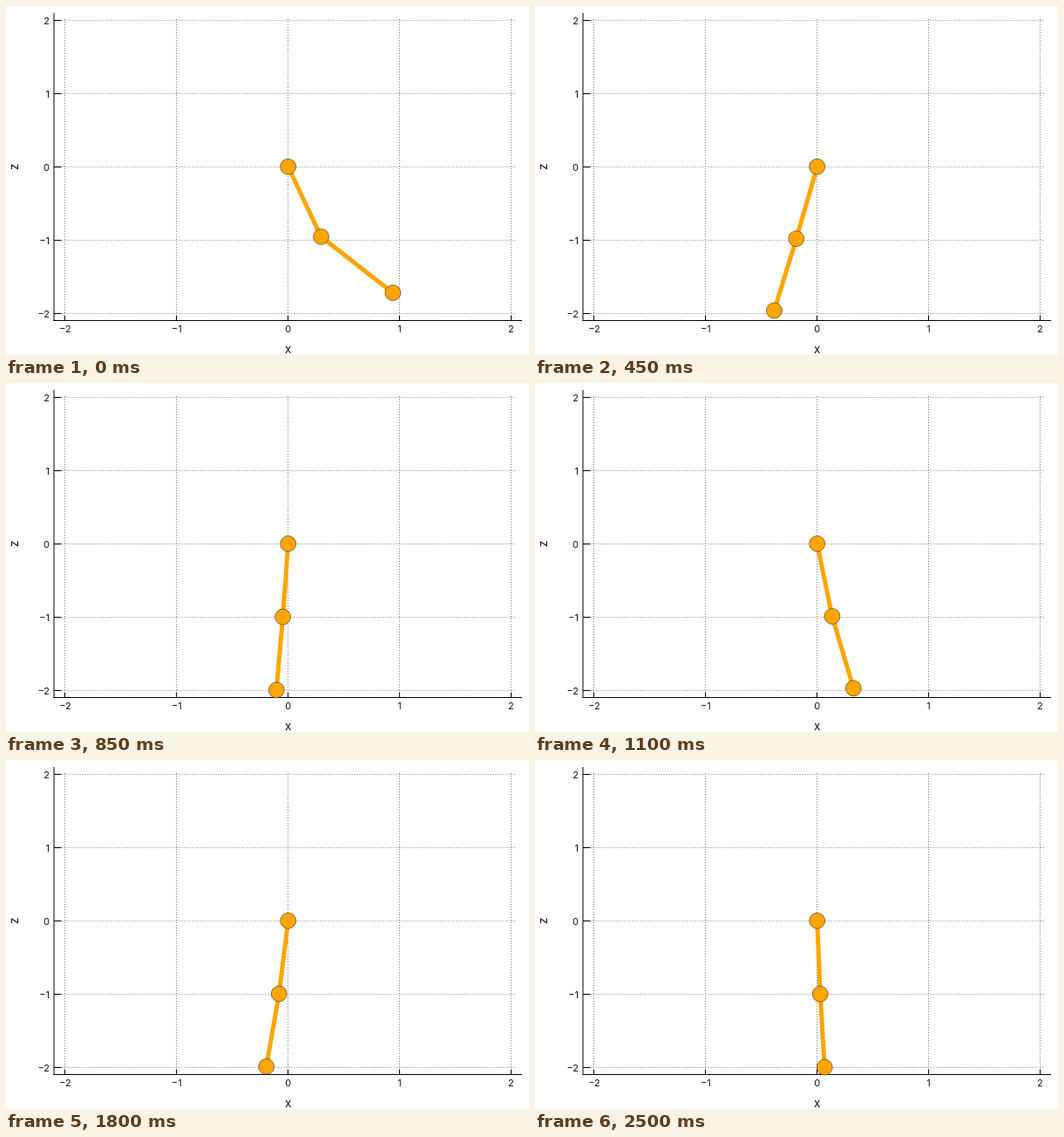
An HTML page that plays this animation: 600x400 px, repeating every 2.55 s.

```html
<!DOCTYPE html>
<html lang="en">
<head>
<meta charset="utf-8">
<title>Damped double pendulum</title>
<style>
  html, body { margin: 0; width: 100%; height: 100%; overflow: hidden; background: #fff; }
  svg { display: block; width: 600px; height: 400px; }
  text { font-family: Inter, "Liberation Sans", sans-serif; font-size: 11px; fill: #111; }
  .name { font-size: 13.5px; }
  .axis { stroke: #000; stroke-width: 1; fill: none; }
  .grid { stroke: #000; stroke-opacity: .5; stroke-width: 1; stroke-dasharray: 1 2; fill: none; }
  #arm { stroke: #ffa500; stroke-width: 5; stroke-linejoin: round; fill: none; }
  circle { fill: #ffa500; stroke: #000; stroke-opacity: .65; stroke-width: .7; }
</style>
</head>
<body>
<svg viewBox="0 0 600 400">
  <g id="plot"></g>
  <polyline id="arm"/>
  <g id="joints"><circle r="9"/><circle r="9"/><circle r="9"/></g>
</svg>
<script>
const STEP = 50, COUNT = 51;
const px = x => 323.7 + 127.87 * x;
const py = z => 184.2 - 84 * z;

const plot = document.getElementById('plot');
const arm = document.getElementById('arm');
const joints = [...document.querySelectorAll('#joints circle')];

function add(tag, attrs, text = '') {
  const el = document.createElementNS('http://www.w3.org/2000/svg', tag);
  for (const key in attrs) el.setAttribute(key, attrs[key]);
  el.textContent = text;
  plot.append(el);
}
const line = (cls, d) => add('path', { class: cls, d });
const snap = v => Math.floor(v) + 0.5;

function drawPlot() {
  const ticks = [-2, -1, 0, 1, 2];
  for (const v of ticks) {
    line('grid', `M63.5 ${snap(py(v))}H584`);
    line('grid', `M${snap(px(v))} 355V13`);
  }
  line('axis', 'M55 8V361M54.5 360.5H592');
  for (const v of ticks) {
    const label = String(v).replace('-', '\u2212');
    line('axis', `M55 ${snap(py(v))}h8.5M${snap(px(v))} 360.5v-5.5`);
    add('text', { x: 50, y: py(v) + 4.3, 'text-anchor': 'end' }, label);
    add('text', { x: px(v), y: 374, 'text-anchor': 'middle' }, label);
  }
  add('text', { class: 'name', x: 323.7, y: 398, 'text-anchor': 'middle' }, 'x');
  add('text', { class: 'name', 'text-anchor': 'middle', transform: 'translate(14 184.2) rotate(-90)' }, 'z');
}

// Two uniform unit rods with viscous friction in both joints.
function slope([q1, q2, v1, v2]) {
  const g = 9.81, c = Math.cos(q2), h = 0.5 * Math.sin(q2);
  const m11 = 5 / 3 + c, m12 = 1 / 3 + c / 2, m22 = 1 / 3;
  const pull = 0.5 * g * Math.sin(q1 + q2);
  const f1 = h * (2 * v1 * v2 + v2 * v2) - 1.5 * g * Math.sin(q1) - pull - 2.4 * v1;
  const f2 = -h * v1 * v1 - pull - 2.05 * v2;
  const det = m11 * m22 - m12 * m12;
  return [v1, v2, (m22 * f1 - m12 * f2) / det, (m11 * f2 - m12 * f1) / det];
}

function rk4(s, dt) {
  const move = (k, f) => s.map((v, i) => v + k[i] * f);
  const a = slope(s), b = slope(move(a, dt / 2));
  const c = slope(move(b, dt / 2)), d = slope(move(c, dt));
  return s.map((v, i) => v + dt / 6 * (a[i] + 2 * b[i] + 2 * c[i] + d[i]));
}

function simulate() {
  const poses = [], sub = 30, dt = 0.1034 / sub;
  let state = [0.3, 0.4, 0, 0];
  for (let i = 0; i < COUNT; i++) {
    const [q1, q2] = state, q = q1 + q2;
    const x = Math.sin(q1), z = -Math.cos(q1);
    poses.push([[0, 0], [x, z], [x + Math.sin(q), z - Math.cos(q)]]
      .map(([u, w]) => [px(u), py(w)]));
    for (let k = 0; k < sub; k++) state = rk4(state, dt);
  }
  return poses;
}

drawPlot();
const poses = simulate();
const start = performance.now();

function draw(now) {
  const t = Math.max(0, now - start);
  const pose = poses[Math.floor(t / STEP) % COUNT];
  arm.setAttribute('points', pose.join(' '));
  joints.forEach((el, i) => {
    el.setAttribute('cx', pose[i][0]);
    el.setAttribute('cy', pose[i][1]);
  });
  requestAnimationFrame(draw);
}
draw(start);
</script>
</body>
</html>
```
